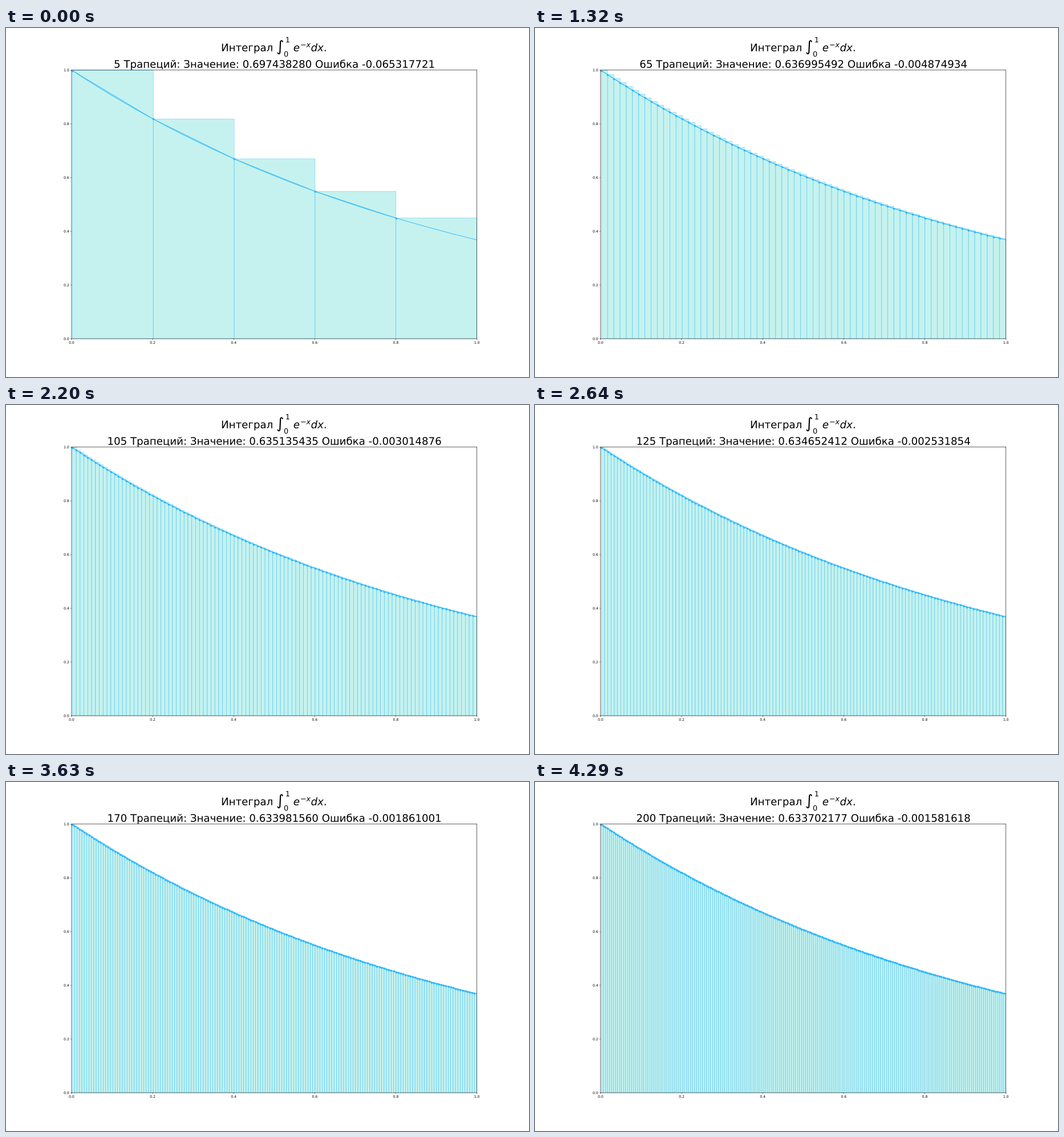
These frames come from a looping animation (917x611 px, 4400 ms). A matplotlib script:

```python
import matplotlib.pyplot as plt
import numpy as np
from matplotlib.animation import FuncAnimation
from matplotlib.collections import PolyCollection
from matplotlib.patheffects import Normal

W, H = 917, 611
DPI = W / 21
FRAMES, STEP, INTERVAL = 40, 5, 110
LINE, FILL = "#2cb8fc", "#a7ebe6"
START = 0.002  # left end of the drawn bars and curve
EXACT = 1 - np.exp(-1)

plt.rcParams.update({
    "font.family": "DejaVu Sans",
    "text.hinting": "no_hinting",
    "path.snap": False,
})


def f(x):
    return np.exp(-x)


def left_sum(n):
    return f(np.arange(n) / n).sum() / n


fig = plt.figure(figsize=(W / DPI, H / DPI), dpi=DPI, facecolor="white")
ax = fig.add_axes([0.1253, 0.1096, 0.775, 0.77])
ax.set(xlim=(0, 1), ylim=(0, 1))
ticks = np.arange(6) / 5
ax.set_xticks(ticks)
ax.set_yticks(ticks)
for spine in ax.spines.values():
    spine.set_linewidth(1)

bars = PolyCollection([], facecolor=FILL, edgecolor=LINE, linewidth=1,
                      alpha=0.65, zorder=1)
ax.add_collection(bars, autolim=False)
grid = np.linspace(START, 1, 200)
ax.plot(grid, f(grid), color=LINE, lw=1.5)
nodes, = ax.plot([], [], color=LINE, lw=1.5, marker=".", markersize=10)
title = ax.set_title("", fontsize=30, x=0.499, pad=6.5)

# Outlined glyphs keep sub-pixel positions at this low resolution.
for text in [title, *ax.get_xticklabels(), *ax.get_yticklabels()]:
    text.set_path_effects([Normal()])


def update(i):
    n = STEP * (i + 1)
    edges = np.linspace(START, 1, n + 1)
    x, y = edges[:-1], f(edges[:-1])
    total = left_sum(n)
    bars.set_verts([[(a, 0), (a, h), (b, h), (b, 0)]
                    for a, b, h in zip(x, edges[1:], y)])
    nodes.set_data(x, y)
    title.set_text(
        "Интеграл $\\int_0^1\\ e^{-x}dx$.\n"
        f"{n} Трапеций: Значение: {total:.9f} Ошибка {EXACT - total:.9f}")
    return bars, nodes, title


anim = FuncAnimation(fig, update, frames=FRAMES, interval=INTERVAL,
                     repeat=True, repeat_delay=0, blit=False)
plt.show()
```
